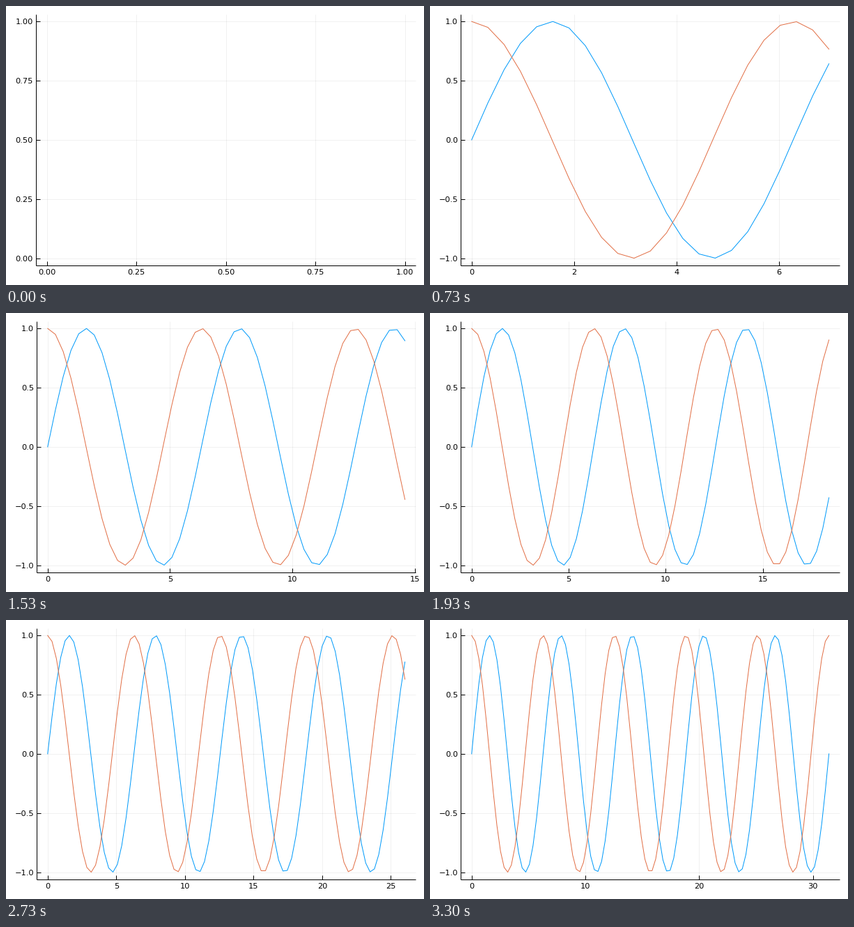
Write a matplotlib script that moves like this. It is 600 px wide and 400 px high and loops after 3.33 s.

```python
import math

import matplotlib.pyplot as plt
import numpy as np
from matplotlib.animation import FuncAnimation
from matplotlib.collections import LineCollection

W, H, DPI = 600, 400, 100
STEP_COUNT = 100
TICK_MS, LOOP_MS = 10, 3330
FRAMES = LOOP_MS // TICK_MS
PX = 72 / DPI  # one pixel in points

TOP, BOTTOM, RIGHT = 12.0, 371.7, 588.0
TICK = 5.5
WIDEN = 0.03
BLUE, ORANGE = "#009AFA", "#E26F46"

# step mantissas with their niceness
STEPS = [(1, 1.0), (5, 0.9), (2, 0.7), (2.5, 0.5), (3, 0.2)]

plt.rcParams["font.family"] = "DejaVu Sans"
xs = np.linspace(0, 10 * math.pi, STEP_COUNT)
curves = [(np.sin(xs), BLUE), (np.cos(xs), ORANGE)]

fig = plt.figure(figsize=(W / DPI, H / DPI), dpi=DPI, facecolor="white")
ax = fig.add_axes([0, 0, 1, 1])


def widened(lo, hi):
    if hi <= lo:
        hi = lo + 1
    pad = WIDEN * (hi - lo)
    return lo - pad, hi + pad


def best_ticks(lo, hi):
    """Return the best scoring (value, label) ticks, 4 to 8 of them."""
    span = hi - lo
    top = math.floor(math.log10(span))
    options = []
    for z in range(top - 2, top + 1):
        for q, nice in STEPS:
            step = q * 10.0 ** z
            first = math.ceil(lo / step - 1e-9)
            last = math.floor(hi / step + 1e-9)
            n = last - first + 1
            if 4 <= n <= 8:
                score = (0.25 * (1 - abs(n - 5) / 5)
                         + 0.5 * span / ((n - 1) * step) + 0.25 * nice)
                digits = max(0, (q == 2.5) - z)
                options.append((round(score, 9), -n, first, last, step, digits))
    _, _, first, last, step, digits = max(options)
    values = [i * step for i in range(first, last + 1)]
    return [(v, f"{v:.{digits}f}".replace("-", "\u2212")) for v in values]


def rules(segments, alpha, z):
    ax.add_collection(LineCollection(segments, colors="black", alpha=alpha,
                                     linewidths=PX, zorder=z),
                      autolim=False)


def label(x, y, text, ha):
    ax.text(x, y, text, ha=ha, va="baseline", fontsize=8.2, color="black")


def draw(frame):
    # points arrive evenly, timed to the nearest tick
    k = int((frame + 0.5) * STEP_COUNT / FRAMES)

    ax.clear()
    ax.set_xlim(0, W)
    ax.set_ylim(H, 0)
    ax.axis("off")

    seen = [ys[:k + 1] for ys, _ in curves]
    x0, x1 = widened(0, xs[k])
    y0, y1 = widened(min(map(np.min, seen)), max(map(np.max, seen)))
    xticks, yticks = best_ticks(x0, x1), best_ticks(y0, y1)

    # a minus sign in the labels pushes the axis to the right
    left = 44.4 if yticks[0][0] < 0 else 43.4

    def to_x(x):
        return left + (x - x0) / (x1 - x0) * (RIGHT - left)

    def to_y(y):
        return BOTTOM - (y - y0) / (y1 - y0) * (BOTTOM - TOP)

    grid = []
    axes = [[(left, TOP), (left, BOTTOM)], [(left, BOTTOM), (RIGHT, BOTTOM)]]
    for value, text in xticks:
        x = to_x(value)
        grid.append([(x, TOP), (x, BOTTOM)])
        axes.append([(x, BOTTOM), (x, BOTTOM - TICK)])
        label(x, 385, text, "center")
    for value, text in yticks:
        y = to_y(value)
        grid.append([(left, y), (RIGHT, y)])
        axes.append([(left, y), (left + TICK, y)])
        label(left - 4.4, y + 4, text, "right")
    rules(grid, 0.055, 1)
    rules(axes, 1, 3)

    if k:
        for ys, color in curves:
            ax.plot(to_x(xs[:k + 1]), to_y(ys[:k + 1]), color=color, lw=PX,
                    zorder=4, solid_joinstyle="round")
    return []


anim = FuncAnimation(fig, draw, frames=FRAMES, interval=TICK_MS,
                     init_func=lambda: draw(0), repeat=True, repeat_delay=0)
plt.show()
```
